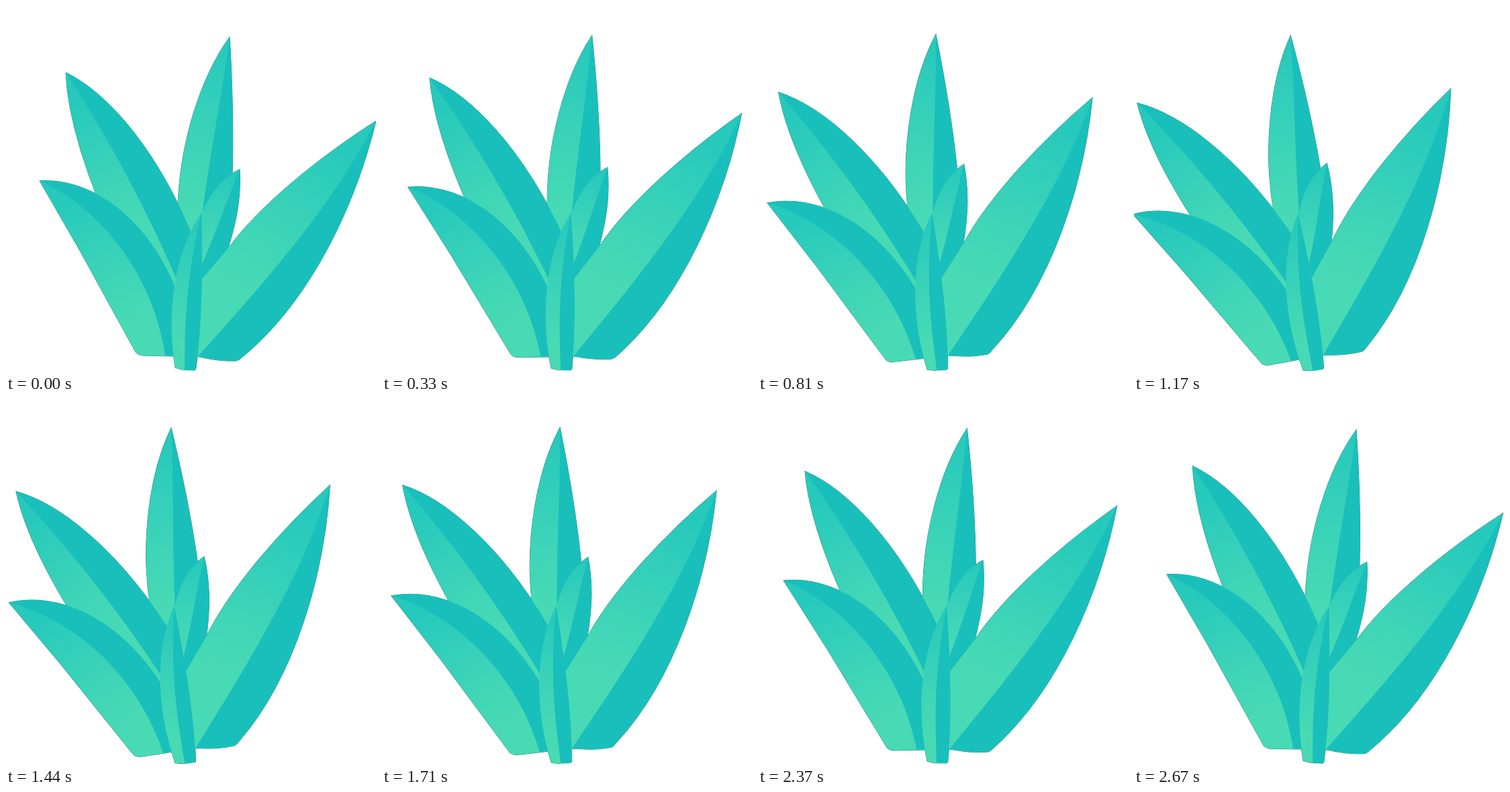
Write an HTML page that moves like this. It is 551 px wide and 543 px high and loops after 2700 ms.

```html
<!DOCTYPE html>
<html lang="en">
<head>
<meta charset="utf-8">
<title>Swaying plant</title>
<style>
  html, body { margin: 0; width: 100%; height: 100%; overflow: hidden; background: #fff; }
  svg { display: block; width: 100%; height: 100%; }
</style>
</head>
<body>
<svg viewBox="0 0 551 543"><defs></defs><g id="plant"></g></svg>
<script>
const PIVOT = '272 540';
const LOOP = 2700, STEP = 30;
// [time in ms, tilt to the left in degrees]
const SWAY = [[0, 0], [330, 2.35], [540, 3.9], [810, 7.85], [1170, 11.5], [1210, 11.9],
              [1710, 7.83], [2370, 2.5], [LOOP, 0]];

// Back to front: whole outline, shaded half, gradient line from tip to base
const LEAVES = [
  { outline: 'M333 46C290 105 258 205 256 300L270 400L320 380L337 250C339 190 337 110 333 46Z',
    shade: 'M333 46C322 130 304 220 292 310V400L320 380L337 250C339 190 337 110 333 46Z',
    glow: [300, 60, 285, 310] },
  { outline: 'M89 99C150 128 222 210 275 335L262 425L200 420L170 365Q93 198 89 99Z',
    shade: 'M89 99C150 128 222 210 275 335L262 425Q190 254 89 99Z',
    glow: [95, 150, 205, 330] },
  { outline: 'M348 243C318 257 292 292 283 340L278 420H300L331 360C345 315 350 280 348 243Z',
    shade: 'M348 243C330 285 312 340 290 388V420H300L331 360C345 315 350 280 348 243Z',
    glow: [320, 245, 290, 375] },
  { outline: 'M551 171C469 223 379 295 331 360L275 426V521L288 522Q318 529 342 528Q346 528 351 523C450 443 520 300 551 171Z',
    shade: 'M551 171C490 290 400 395 286 521Q318 529 342 528Q346 528 351 523C450 443 520 300 551 171Z',
    glow: [475, 195, 350, 420] },
  { outline: 'M50 260C120 256 205 305 253 420L262 521L248 521L203 520Q196 519 193 515L110 364Z',
    shade: 'M50 260C120 256 205 305 253 420L262 521L237 520C220 400 140 300 50 260Z',
    glow: [100, 285, 190, 470] },
  { outline: 'M291 308C258 355 236 440 252 538L262 541L280 542Q283 542 283 538C292 475 293 400 291 308Z',
    shade: 'M291 308C272 390 266 450 266 541L280 542Q283 542 283 538C292 475 293 400 291 308Z',
    glow: [275, 315, 252, 500] }
];

const plant = document.getElementById('plant');
const path = (d, attrs) => `<path d="${d}" ${attrs}/>`;

document.querySelector('defs').innerHTML = LEAVES.map(({ glow: [x1, y1, x2, y2] }, i) =>
  `<linearGradient id="glow${i}" gradientUnits="userSpaceOnUse" x1="${x1}" y1="${y1}" x2="${x2}" y2="${y2}">
    <stop stop-color="#27c9bc"/><stop offset=".5" stop-color="#39d2b9"/><stop offset="1" stop-color="#48dab4"/>
  </linearGradient>`).join('');

// A fine dark rim shows only around the joint silhouette
plant.innerHTML =
  LEAVES.map(leaf => path(leaf.outline, 'fill="none" stroke="#287f7d"')).join('') +
  LEAVES.map((leaf, i) => path(leaf.outline, `fill="url(#glow${i})"`) + path(leaf.shade, 'fill="#19bfbb"')).join('');

function tiltAt(time) {
  const next = SWAY.findIndex(([t]) => t > time);
  const [t0, a0] = SWAY[next - 1], [t1, a1] = SWAY[next];
  return a0 + (a1 - a0) * (time - t0) / (t1 - t0);
}

function draw() {
  const time = Math.floor(performance.now() % LOOP / STEP) * STEP;
  plant.setAttribute('transform', `rotate(${-tiltAt(time)} ${PIVOT})`);
  requestAnimationFrame(draw);
}
draw();
</script>
</body>
</html>
```
